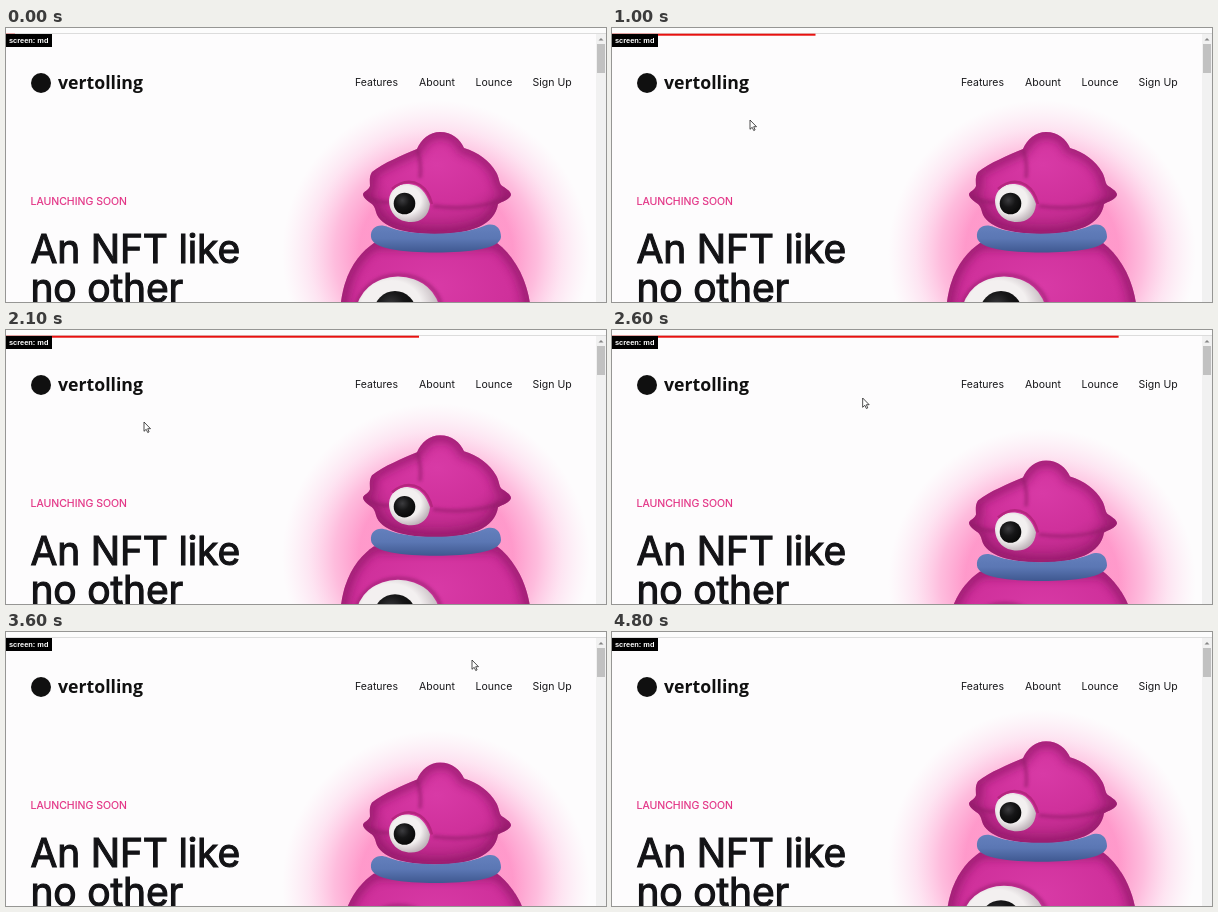
Animation of 600 by 274 pixels, one loop 4900 ms. Source, as an HTML page:

```html
<!DOCTYPE html>
<html lang="en">
<head>
<meta charset="utf-8">
<title>Landing page</title>
<style>
html, body { margin: 0; width: 100%; height: 100%; overflow: hidden; background: #fdfcfd; }
svg { display: block; width: 600px; height: 274px; font-family: Inter, sans-serif; }
.nav { font-size: 10.5px; fill: #18181b; }
.kicker { font-size: 10.5px; fill: #e22f83; stroke: #e22f83; stroke-width: .15px; }
.title { font-size: 39px; letter-spacing: -.2px; fill: #131316; stroke: #131316; stroke-width: 1.1px; }
.brand { font: 700 17.7px "Open Sans", sans-serif; fill: #101010; }
.tag { font: 700 7.4px "Liberation Sans", Arial, sans-serif; fill: #fff; }
.rim { fill: none; stroke: #8a1763; stroke-width: 13px; opacity: .65; filter: url(#soft); }
.shade { fill: none; stroke: #8f1a68; stroke-width: 4px; opacity: .5; filter: url(#fine); }
</style>
</head>
<body>
<svg viewBox="0 0 600 274">
  <defs>
    <radialGradient id="glow" gradientUnits="userSpaceOnUse" cx="430" cy="226" r="154">
      <stop offset=".5" stop-color="#ff88c2" stop-opacity=".85"/>
      <stop offset=".66" stop-color="#ff92c8" stop-opacity=".6"/>
      <stop offset=".82" stop-color="#ffa5d4" stop-opacity=".27"/>
      <stop offset="1" stop-color="#ffc0e0" stop-opacity="0"/>
    </radialGradient>
    <radialGradient id="skin" cx=".5" cy=".32" r=".65">
      <stop offset="0" stop-color="#d83aa6"/>
      <stop offset=".6" stop-color="#cf309b"/>
      <stop offset="1" stop-color="#b32683"/>
    </radialGradient>
    <linearGradient id="ring" x2="0" y2="1">
      <stop offset="0" stop-color="#6480bd"/>
      <stop offset=".5" stop-color="#5b77b4"/>
      <stop offset="1" stop-color="#3f5890"/>
    </linearGradient>
    <radialGradient id="white" cx=".42" cy=".42" r=".6">
      <stop offset=".6" stop-color="#f3f0f0"/>
      <stop offset="1" stop-color="#bfb4ba"/>
    </radialGradient>
    <radialGradient id="pupil" cx=".4" cy=".35" r=".65">
      <stop offset="0" stop-color="#3c3c3f"/>
      <stop offset=".5" stop-color="#161617"/>
      <stop offset="1" stop-color="#090909"/>
    </radialGradient>
    <filter id="soft" x="-30%" y="-30%" width="160%" height="160%"><feGaussianBlur stdDeviation="5"/></filter>
    <filter id="fine" x="-50%" y="-50%" width="200%" height="200%"><feGaussianBlur stdDeviation="1.800"/></filter>
    <path id="body" d="M368 215C352 226 336 246 334 285C332 330 375 350 430 350C485 350 527 330 525 285C523 253 508 228 491 215Z"/>
    <path id="head" d="M411 121C415 111 424 104 434 104C446 104 454 111 458 120C472 124 484 133 490 144C493 149 493 154 495 157C499 160 505 163 505 167C503 172 497 173 492 176C489 197 464 206 431 206C399 206 374 199 370 184C369 180 368 178 366 176C361 173 357 169 357 166C358 163 363 162 364 158C364 152 363 149 366 144C377 135 397 127 411 121Z"/>
    <clipPath id="inBody"><use href="#body"/></clipPath>
    <clipPath id="inHead"><use href="#head"/></clipPath>
  </defs>

  <rect width="600" height="274" fill="#fdfcfd"/>

  <g id="toy">
    <circle cx="430" cy="226" r="154" fill="url(#glow)"/>
    <use href="#body" fill="url(#skin)"/>
    <g clip-path="url(#inBody)">
      <use href="#body" class="rim"/>
      <ellipse class="shade" cx="393" cy="284" rx="43" ry="37"/>
    </g>
    <ellipse cx="392" cy="284" rx="41.500" ry="35.500" fill="url(#white)"/>
    <circle cx="389" cy="284" r="21" fill="url(#pupil)"/>

    <use href="#head" fill="url(#skin)"/>
    <g clip-path="url(#inHead)">
      <use href="#head" class="rim"/>
      <path class="shade" d="M411 121Q416 136 414 150M358 167Q371 176 384 174M427 178Q470 184 503 169"/>
    </g>
    <path d="M383 172C384 161 393 155 403 156C414 157 420 164 424 176C423 188 415 194 405 194C392 194 383 185 383 172Z" fill="url(#white)"/>
    <path d="M386 161Q400 149 414 157Q423 163 426 176" fill="none" stroke="#b5267f" stroke-width="2.500"/>
    <circle cx="398.500" cy="175.500" r="10.800" fill="url(#pupil)"/>

    <path fill="url(#ring)" d="M365 209C364 199 373 195 382 199C405 208 455 208 478 198C488 194 495 199 495 209C494 221 463 224.500 430 224.500C397 224.500 366 221 365 209Z"/>
  </g>

  <circle cx="35" cy="55" r="10" fill="#101010"/>
  <text class="brand" x="52" y="61">vertolling</text>
  <g class="nav">
    <text x="349" y="58">Features</text>
    <text x="413" y="58">Abount</text>
    <text x="469.500" y="58">Lounce</text>
    <text x="526.500" y="58">Sign Up</text>
  </g>
  <text class="kicker" x="24.500" y="177">LAUNCHING SOON</text>
  <g class="title">
    <text x="24.500" y="234.500">An NFT like</text>
    <text x="24.500" y="273.500">no other</text>
  </g>

  <rect width="600" height="5" fill="#fcfcfc"/>
  <rect y="5" width="600" height="1" fill="#dcdcdc"/>
  <rect x="590" y="6" width="10" height="268" fill="#f1f1f1"/>
  <path d="M592.500 12.500L595 10L597.500 12.500Z" fill="#858585"/>
  <rect x="591" y="16" width="8" height="29" fill="#c1c1c1"/>

  <rect id="bar" y="5.700" height="2" fill="#e8110f"/>
  <rect y="6" width="46" height="13" fill="#000"/>
  <text class="tag" x="3" y="15">screen: md</text>
  <path id="cursor" d="M0 0V9.300L2.200 7.300L3.700 10.500L5.100 9.900L3.700 6.700H6.500Z" fill="#fff" stroke="#222" stroke-width=".8"/>
</svg>
<script>
const LOOP = 4900, STEP = 100, BOUNCE = 53;
const [toy, bar, cursor] = ['toy', 'bar', 'cursor'].map(id => document.getElementById(id));

// Keys are [time, ...values], joined by straight segments.
const barKeys = [[0, 9], [500, 106], [1500, 301], [2100, 413], [2730, 531]];
const cursorKeys = [[2400, 138, 92], [3000, 476, 20], [3400, 476, 20], [3600, 466, 28], [4100, 270.5, 206]];

function track(keys, t) {
  if (t <= keys[0][0]) return keys[0].slice(1);
  const i = keys.findIndex(key => key[0] > t);
  if (i < 0) return keys[keys.length - 1].slice(1);
  const [from, to] = [keys[i - 1], keys[i]];
  const k = (t - from[0]) / (to[0] - from[0]);
  return from.slice(1).map((v, n) => v + (to[n + 1] - v) * k);
}

// Cubic easing with control points (x1, y1) and (x2, y2), solved by bisection.
function bezier(x1, y1, x2, y2, x) {
  const at = (a, b, s) => 3 * (1 - s) ** 2 * s * a + 3 * (1 - s) * s * s * b + s ** 3;
  let lo = 0, hi = 1;
  for (let i = 0; i < 30; i++) {
    const mid = (lo + hi) / 2;
    if (at(x1, x2, mid) < x) lo = mid; else hi = mid;
  }
  return at(y1, y2, lo);
}

function bounce(t) {
  const phase = t % 1000 / 500;
  return BOUNCE * (phase < 1
    ? bezier(.8, 0, 1, 1, phase)
    : 1 - bezier(0, 0, .2, 1, phase - 1));
}

function show(node, visible) {
  node.setAttribute('visibility', visible ? 'visible' : 'hidden');
}

function render(t) {
  toy.setAttribute('transform', `translate(0 ${bounce(t).toFixed(2)})`);
  bar.setAttribute('width', track(barKeys, t)[0]);
  show(bar, t < 3400);
  const [x, y] = track(cursorKeys, t);
  cursor.setAttribute('transform', `translate(${x} ${y})`);
  show(cursor, t >= 100 && t < 4500);
}

const start = performance.now();
function tick() {
  const t = (performance.now() - start) % LOOP;
  render(Math.floor(t / STEP) * STEP);
  requestAnimationFrame(tick);
}
tick();
</script>
</body>
</html>
```
